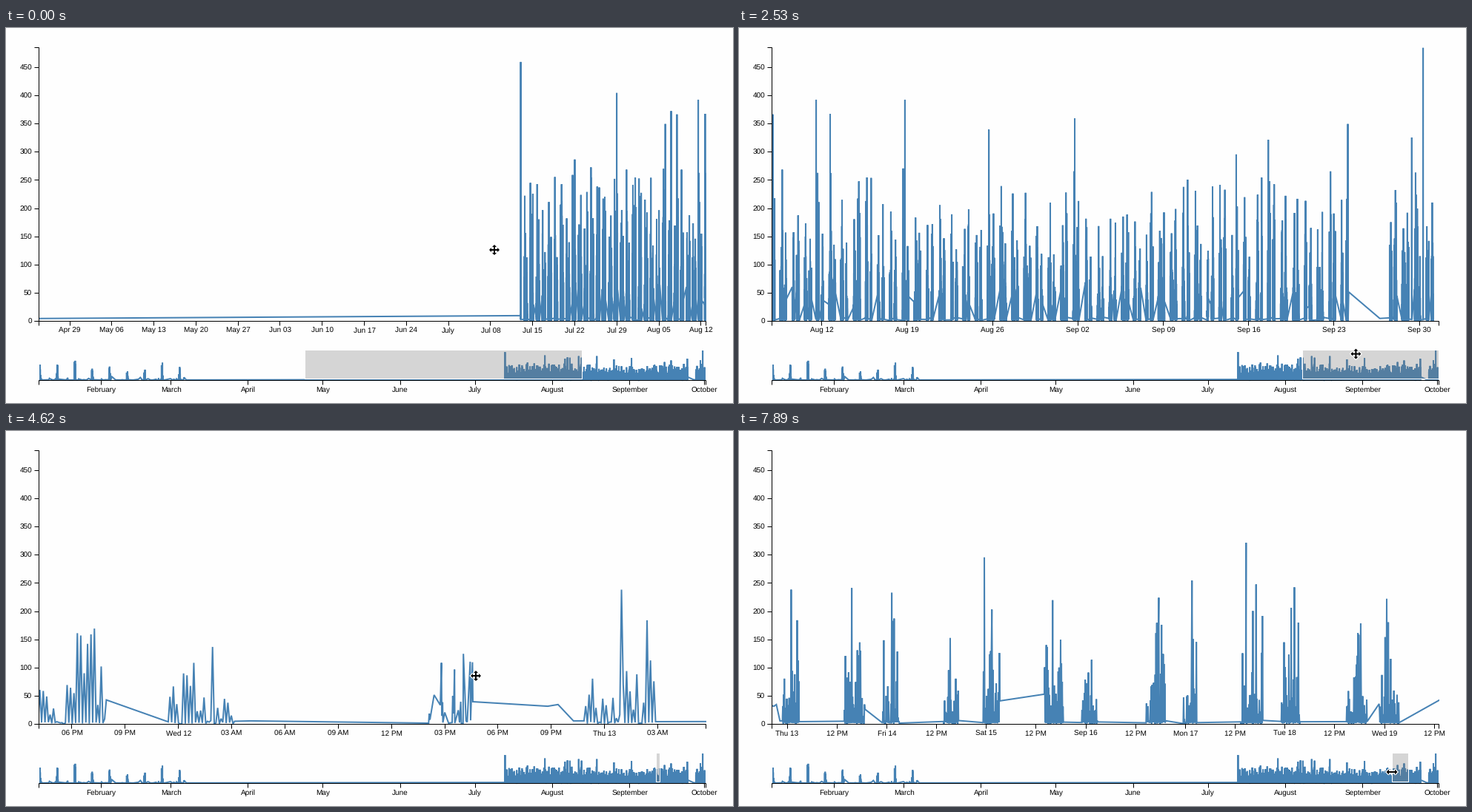
Animation of 981 by 507 pixels, one loop 8000 ms. Source, as a matplotlib script:

```python
import numpy as np
import matplotlib.pyplot as plt
from matplotlib.animation import FuncAnimation
from matplotlib.patches import Polygon, Rectangle
from matplotlib.patheffects import withStroke

W, H, DPI = 981, 507, 64
PX = 72 / DPI                       # points per pixel
STEP, LOOP = 50, 8000
LEFT, WIDTH = 44.5, 900
BASE, UNIT = 396.5, 0.7622          # focus chart: zero line, pixels per unit
MINI_BASE, MINI_UNIT = 476, 0.0824  # overview chart
FIRST_DAY, DAY_PX = 6.03, 3.3636    # days are counted from 1 January
BLUE = "#4682b4"

MONTHS = ("January February March April May June July "
          "August September October").split()
MONTH_START = np.cumsum([0, 31, 28, 31, 30, 31, 30, 31, 31, 30])
WEEKDAYS = "Mon Tue Wed Thu Fri Sat Sun".split()
TICK_STEPS = np.array([1, 3, 6, 12, 24, 168, 720]) / 24

# The tallest spikes: day, value
RECORDS = [(193.01, 460), (202, 287), (208.98, 405), (217.06, 350), (218.03, 373),
           (219, 367), (222.54, 393), (223.69, 368), (229.82, 393), (236.7, 340),
           (243.74, 360), (256.98, 296), (259.61, 322), (266.13, 350),
           (271.37, 326), (272.3, 485)]

# The calm day, 12 September: minutes after 2 PM, value
CALM_DAY = 254
CALM = [(-595, 6), (5.5, 2), (7.6, 19), (10, 8), (24, 52), (45, 34), (48.8, 109),
        (50, 15), (52.7, 39), (53.7, 3), (60, 21), (73, 2), (85, 3), (87, 50),
        (90, 19), (93, 97), (94, 2), (106, 25), (110, 3), (114, 40), (116, 2),
        (122, 2), (123, 125), (132, 6), (136, 4), (146, 111), (147.4, 7),
        (153.7, 110), (155, 40), (408, 32), (443, 35), (495, 6)]


def session(rng, begin, end, height):
    """Dense spikes under a lumpy envelope, between two calm ends."""
    days = np.arange(begin, end, 0.004)
    phase = np.linspace(0, np.pi, len(days))
    lumps = 0.65 + 0.35 * np.sin(rng.uniform(1, 5) * phase + rng.uniform(0, 6))
    values = 0.95 * height * lumps * rng.random(len(days)) ** 1.4
    values[::2] = rng.uniform(1, 4, len(values[::2]))
    values[rng.integers(len(days) // 4, len(days) * 3 // 4)] = height
    for edge in (0, -1):
        values[edge] = rng.uniform(20, 65) if rng.random() < 0.2 else rng.uniform(1, 7)
    return list(zip(days, values))


def build_series():
    rng = np.random.default_rng(12)
    points = [(d, 1 + 55 * rng.random() ** 4) for d in rng.uniform(6.03, 67.5, 90)]
    for day in np.linspace(6.2, 62.2, 9):               # one busy day a week
        points += session(rng, day, day + 0.5, rng.uniform(140, 320))
    points += [(67.7, 2), (192.98, 10), (193.03, 3), (266.2, 52), (268.75, 5)]

    for day in [*range(193, 266), *range(269, 273)]:
        if day != CALM_DAY:
            begin = day + rng.uniform(0.55, 0.62)
            points += session(rng, begin, begin + rng.uniform(0.15, 0.3),
                              rng.uniform(150, 275))
        points += session(rng, day + rng.uniform(0.93, 0.98),
                          day + rng.uniform(1.1, 1.16), rng.uniform(110, 255))
    for day, value in RECORDS:
        points += [(day - 0.015, 3), (day, value), (day + 0.015, 3)]
    points += [(CALM_DAY + 14 / 24 + m / 1440, v) for m, v in CALM]
    return np.array(sorted(points)).T


DAYS, VALUES = build_series()


def beats(first, last):
    return np.linspace(first, last, round((last - first) / 150) + 1)


def zoom(anchor, at, first, last, from_span, to_span):
    """Wheel zoom that keeps the anchor day at one place in the chart."""
    times = beats(first, last)
    return [(t, anchor - at * span, span)
            for t, span in zip(times, np.geomspace(from_span, to_span, len(times)))]


def pan(first, last, start, stop, span):
    times = beats(first, last)
    ease = np.linspace(0, 1, len(times)) ** 1.58
    return [(t, start + (stop - start) * e, span) for t, e in zip(times, ease)]


def glide(first, last, start, stop):
    times = beats(first, last)
    return list(zip(times, *(np.linspace(a, b, len(times))
                             for a, b in zip(start, stop))))


# Visible window: ms, first day, span in days
WHEEL = (254.698, 0.655)
VIEWS = (zoom(188.63, 0.6828, 0, 450, 110.95, 54.68)
         + pan(1200, 2080, 151.3, 218.92, 54.68)
         + zoom(*WHEEL, 3280, 3280, 52.35, 52.35)
         + zoom(*WHEEL, 3430, 3430, 13.5, 13.5)
         + zoom(*WHEEL, 3720, 3870, 12, 10.54)
         + zoom(*WHEEL, 4020, 4020, 2.75, 2.75)
         + zoom(*WHEEL, 4470, 4920, 2.1, 0.87)
         + zoom(*WHEEL, 5520, 5670, 0.6537, 0.437)
         + zoom(254.847, 0, 7150, 7450, 5.6, 6.7))

# Pointer: ms, x, y
POINTER = (glide(0, 0, (659, 300), (659, 300))
           + glide(600, 1050, (659, 300), (655, 468))
           + glide(1200, 1780, (655, 468), (882, 468))
           + glide(2380, 3130, (882, 468), (634, 331))
           + glide(5520, 6400, (635, 331), (881, 461))
           + glide(7000, 7450, (902, 461), (904, 461))
           + glide(7600, 7890, (904, 461), (881, 461)))
RESIZE_FROM = 6250

ARM = np.array([(-1, -1), (-1, -4), (-3, -4), (0, -7), (3, -4), (1, -4)])
QUARTER = np.array([(0, 1), (-1, 0)])
MOVE = np.vstack([ARM @ np.linalg.matrix_power(QUARTER, k) for k in range(4)])
HALF = np.array([(-7.5, 0), (-4, -3.5), (-4, -1), (4, -1), (4, -3.5)])
RESIZE = np.vstack([HALF, -HALF])


def current(rows, now):
    return [row for row in rows if row[0] <= now][-1]


def tick_days(start, span):
    step = min(TICK_STEPS, key=lambda s: abs(np.log(span / 10 / s)))
    offset = 6 if step == 7 else 0          # weeks begin on Sunday
    first = np.ceil((start - offset) / step)
    last = np.floor((start + span - offset) / step)
    return np.arange(first, last + 1) * step + offset


def tick_label(day):
    day, hour = divmod(round(day * 24), 24)
    if hour:
        return f"{(hour - 1) % 12 + 1:02d} {'AM' if hour < 12 else 'PM'}"
    month = np.searchsorted(MONTH_START, day, side="right") - 1
    date = day - MONTH_START[month] + 1
    if date == 1:
        return MONTHS[month]
    name = MONTHS[month][:3] if day % 7 == 6 else WEEKDAYS[day % 7]
    return f"{name} {date:02d}"


def mini_x(day):
    return LEFT + (day - FIRST_DAY) * DAY_PX


def crisp(x):
    return np.floor(x) + 0.5


plt.rcParams.update({"font.family": "Liberation Sans", "font.size": 10 * PX,
                     "text.hinting": "none"})
fig = plt.figure(figsize=(W / DPI, H / DPI), dpi=DPI, facecolor="#fefefe")
ax = fig.add_axes([0, 0, 1, 1])
ax.set(xlim=(0, W), ylim=(H, 0))
ax.axis("off")


def stroke(x, y, color="black", width=1, z=3):
    return ax.plot(x, y, color=color, lw=width * PX, zorder=z, snap=False,
                   solid_capstyle="butt", solid_joinstyle="miter")[0]


def series(top, bottom):
    line = stroke([], [], BLUE, 2, 2)
    line.set_clip_path(Rectangle((LEFT, top), WIDTH, bottom - top,
                                 transform=ax.transData))
    return line


def tick_marks(xs, y):
    xs = crisp(np.asarray(xs))
    return np.repeat(xs, 3), np.tile([y, y + 6, np.nan], len(xs))


def x_axis(y):
    right = LEFT + WIDTH
    stroke([LEFT, LEFT, right, right], [y + 6, y, y, y + 6])


x_axis(BASE)
x_axis(476.5)
stroke([LEFT - 6, LEFT, LEFT, LEFT - 6], [26.5, 26.5, BASE, BASE])
for value in range(0, 451, 50):
    y = BASE - value * UNIT
    stroke([LEFT - 6, LEFT], [crisp(y)] * 2)
    ax.text(35, y + 3.5, str(value), ha="right", va="baseline")

stroke(*tick_marks(mini_x(MONTH_START[1:]), 476.5))
for name, day in zip(MONTHS[1:], MONTH_START[1:]):
    ax.text(mini_x(day), 492, name, ha="center", va="baseline")

overview = series(435, 478)
overview.set_data(mini_x(DAYS), MINI_BASE - VALUES * MINI_UNIT)
focus = series(26, 397)
ticks = stroke([], [])
labels = [ax.text(0, 412, "", ha="center", va="baseline") for _ in range(24)]
extent = ax.add_patch(Rectangle((0, 435.5), 1, 39, fc=(0.467, 0.467, 0.467, 0.3),
                                ec="white", lw=PX, zorder=2.5, snap=False))
pointer = ax.add_patch(Polygon(MOVE, fc="black", ec="none", zorder=9, path_effects=[
    withStroke(linewidth=2.4 * PX, foreground="white")]))


def draw(frame):
    now = frame * STEP + STEP - 1
    _, start, span = current(VIEWS, now)
    scale = WIDTH / span

    lo = max(np.searchsorted(DAYS, start) - 1, 0)
    hi = np.searchsorted(DAYS, start + span) + 1
    focus.set_data(LEFT + (DAYS[lo:hi] - start) * scale, BASE - VALUES[lo:hi] * UNIT)

    days = tick_days(start, span)
    xs = LEFT + (days - start) * scale
    ticks.set_data(*tick_marks(xs, BASE))
    for label in labels:
        label.set_text("")
    for label, x, day in zip(labels, xs, days):
        label.set_x(x)
        label.set_text(tick_label(day))

    left, right = crisp(mini_x(start)), crisp(mini_x(start + span))
    extent.set_x(left)
    extent.set_width(right - left)

    _, px, py = current(POINTER, now)
    pointer.set_xy((RESIZE if now >= RESIZE_FROM else MOVE) + (px, py))
    return [focus, ticks, extent, pointer, *labels]


anim = FuncAnimation(fig, draw, frames=LOOP // STEP, interval=STEP,
                     repeat=True, repeat_delay=0, blit=False)
plt.show()
```
